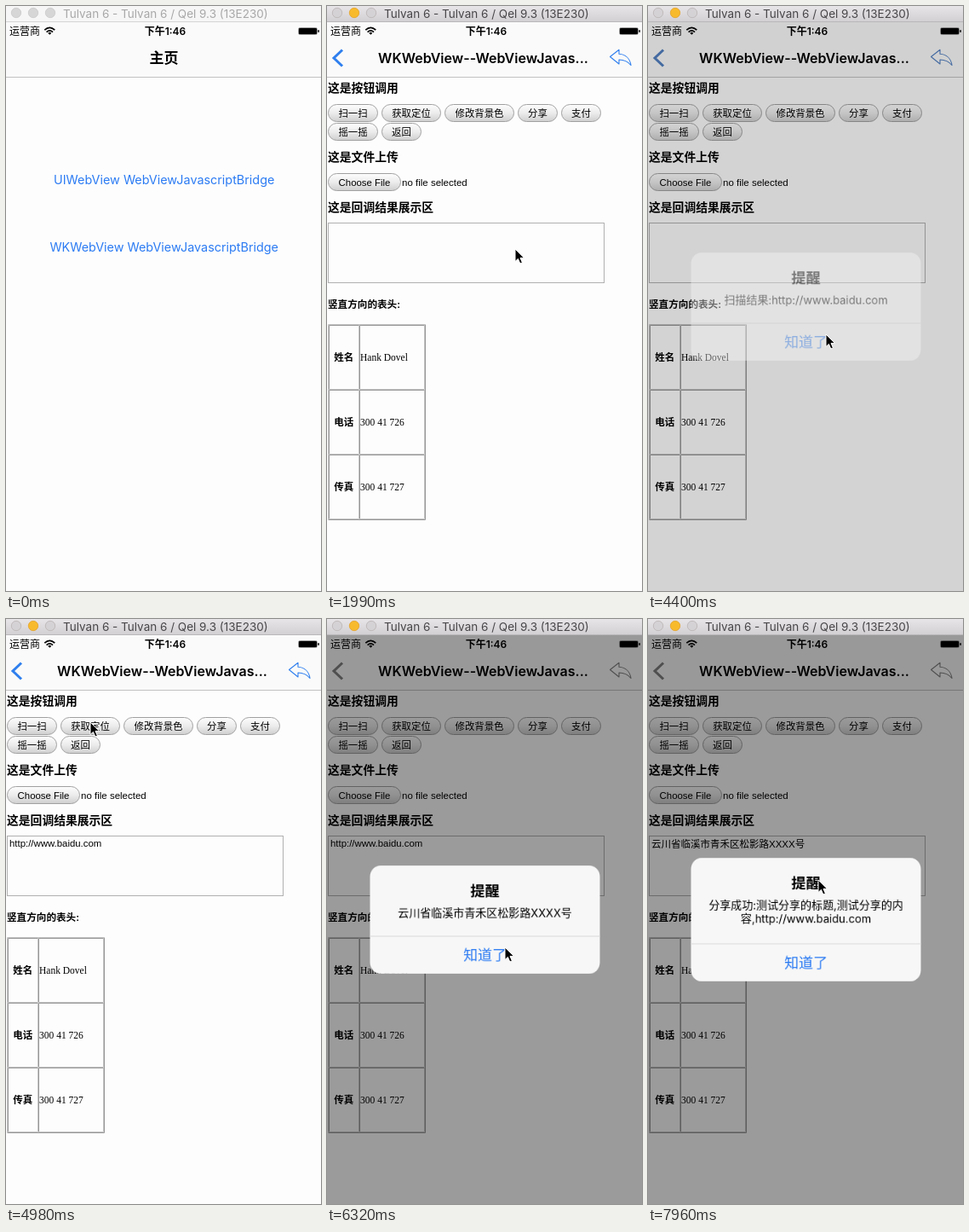
An HTML page that plays this animation: 370x686 px, repeating every 8 s.

```html
<!DOCTYPE html>
<html lang="zh-CN">
<head>
<meta charset="utf-8">
<title>WebViewJavascriptBridge</title>
<style>
  html, body { margin: 0; width: 100%; height: 100%; overflow: hidden; background: #fdfdfd; }
  svg { display: block; width: 370px; height: 686px; overflow: hidden; }
  text { font-family: Inter, "Noto Sans CJK SC", sans-serif; white-space: pre; }
  .web text { font-family: "Liberation Sans", "Noto Sans CJK SC", sans-serif; }
  .web .serif { font-family: "Liberation Serif", serif; }
  .mid { text-anchor: middle; }
  .bold { font-weight: 700; }
  .semi { font-weight: 600; }
  .medium { font-weight: 500; }
  .blue { fill: #2b7bf3; }
  .dull { fill: #a8a8a8; }
  .dark { fill: #484648; }
  .icon { fill: none; stroke: #2f7fee; }

  .anim { animation: 8s infinite both; }
  .step { animation-timing-function: step-end; }
  .push { animation-timing-function: cubic-bezier(.2, .7, .2, 1); }
  .spring { animation-timing-function: cubic-bezier(.22, .5, .2, 1); }

  .idle { animation-name: idle; }
  .active { animation-name: active; }
  .home { animation-name: home; }
  .page { animation-name: page; }
  .homeTitle { animation-name: homeTitle; }
  .pageTitle { animation-name: pageTitle; }
  .icons { animation-name: icons; }
  .icon { animation-name: tint; }
  .web { animation-name: web; }
  .band { animation-name: band; }
  .url { animation-name: url; }
  .place { animation-name: place; }
  .shade, .alert { animation-name: show; }
  .zoom { animation-name: zoom; transform-origin: 185.5px 352.5px; }
  .a1 { animation-name: a1; }
  .a2 { animation-name: a2; }
  .a3 { animation-name: a3; }
  .cursor { animation-name: cursor; animation-timing-function: ease-in-out; }

  @keyframes idle { 0% { opacity: 1 } 16%, to { opacity: 0 } }
  @keyframes active { 0% { opacity: 0 } 16%, to { opacity: 1 } }
  @keyframes home {
    0%, 17.5% { transform: none }
    23.2%, to { transform: translateX(-111px) }
  }
  @keyframes page {
    0%, 17.5% { transform: translateX(375px) }
    23.2%, to { transform: none }
  }
  @keyframes homeTitle {
    0%, 17.5% { transform: none; opacity: 1 }
    23.2%, to { transform: translateX(-150px); opacity: 0 }
  }
  @keyframes pageTitle {
    0%, 17.5% { transform: translateX(150px); opacity: 0 }
    23.2%, to { transform: none; opacity: 1 }
  }
  @keyframes icons { 0%, 17.5% { opacity: 0 } 23.2%, to { opacity: 1 } }
  @keyframes web { 0% { opacity: 0 } 24.8%, to { opacity: 1 } }
  @keyframes band { 0% { opacity: 0 } 87% { opacity: 1 } 95.3%, to { opacity: 0 } }
  @keyframes url { 0% { opacity: 0 } 59% { opacity: 1 } 85%, to { opacity: 0 } }
  @keyframes place { 0% { opacity: 0 } 85%, to { opacity: 1 } }
  @keyframes a1 { 0% { opacity: 1 } 62%, to { opacity: 0 } }
  @keyframes a2 { 0% { opacity: 0 } 62% { opacity: 1 } 88%, to { opacity: 0 } }
  @keyframes a3 { 0% { opacity: 0 } 88%, to { opacity: 1 } }
  @keyframes show {
    0%, 41.95% { opacity: 0 } 46.95%, 53.9% { opacity: 1 }
    58.9%, 69.05% { opacity: 0 } 74.05%, 80% { opacity: 1 }
    85%, 95.5% { opacity: 0 } 99.5%, to { opacity: 1 }
  }
  @keyframes tint {
    0%, 41.95% { stroke: #2f7fee } 46.95%, 53.9% { stroke: #808080 }
    58.9%, 69.05% { stroke: #2f7fee } 74.05%, 80% { stroke: #808080 }
    85%, 95.5% { stroke: #2f7fee } 99.5%, to { stroke: #808080 }
  }
  @keyframes zoom {
    0%, 41.95% { transform: scale(1.2) } 46.95%, 59% { transform: none }
    59.01%, 69.05% { transform: scale(1.2) } 74.05%, 85% { transform: none }
    85.01%, 95.5% { transform: scale(1.2) } 99.5%, to { transform: none }
  }
  @keyframes cursor {
    0%, 9.1% { transform: translate(374px, 470px) }
    15.6%, 31.4% { transform: translate(221px, 285px) }
    37.6%, 43.4% { transform: translate(34.5px, 120px) }
    50.6%, 55.3% { transform: translate(209px, 385px) }
    60.75% { transform: translate(102px, 129px) }
    62.25% { transform: translate(99px, 121px) }
    66.8% { transform: translate(99px, 121px); animation-timing-function: ease-in }
    69.6% { transform: translate(213px, 318px); animation-timing-function: ease-out }
    73%, 80.3% { transform: translate(209px, 385px) }
    87.25% { transform: translate(250px, 152px) }
    90.1%, 95% { transform: translate(237px, 120px) }
    99.4%, to { transform: translate(200px, 306px) }
  }
</style>
</head>
<body>
<svg id="stage" viewBox="0 0 370 686" xmlns="http://www.w3.org/2000/svg"></svg>
<script>
  const device = 'Tulvan 6 - Tulvan 6 / Qel 9.3 (13E230)';
  const link = 'http://www.baidu.com';
  const address = '云川省临溪市青禾区松影路XXXX号';

  // Text whose line is centred on y
  const text = (x, y, size, str, cls = '') =>
    `<text x="${x}" y="${(y + size * .37).toFixed(2)}" font-size="${size}" class="${cls}">${str}</text>`;

  const rect = (x, y, w, h, attrs) =>
    `<rect x="${x}" y="${y}" width="${w}" height="${h}" ${attrs}/>`;

  // Outline with one colour for the top left and one for the bottom right
  const bevel = (x, y, w, h, upper, lower) => `<g fill="none">
    <path stroke="${lower}" d="M${x} ${y + h}h${w}v${-h}"/>
    <path stroke="${upper}" d="M${x} ${y + h}v${-h}h${w}"/></g>`;

  const group = (cls, ...parts) => `<g class="anim ${cls}">${parts.join('')}</g>`;

  const light = (i, fill, stroke) =>
    `<circle cx="${12 + 20 * i}" cy="8" r="5.7" fill="${fill}" stroke="${stroke}" stroke-width=".8"/>`;

  const button = ([left, right, y, label]) =>
    rect(left + .5, y + .5, right - left - 1, 20, 'rx="10" fill="url(#pill)" stroke="#a0a0a0"') +
    text((left + right) / 2, y + 10.5, 11.4, label, 'mid');

  const buttons = [
    [1, 60, 115, '扫一扫'], [64, 134, 115, '获取定位'], [138, 220, 115, '修改背景色'],
    [224, 271, 115, '分享'], [275, 322, 115, '支付'],
    [1, 60, 137, '摇一摇'], [64, 111, 137, '返回'],
    [1, 87, 196, 'Choose File']
  ];

  const rows = [['姓名', 'Hank Dovel'], ['电话', '300 41 726'], ['传真', '300 41 727']];

  const table = bevel(1.5, 373.5, 114, 229, '#c4c4c4', '#979797') +
    rows.map(([head, value], i) => {
      const y = 374.5 + 76 * i;
      return bevel(2.5, y, 35, 75, '#979797', '#c4c4c4') +
        bevel(38.5, y, 76, 75, '#979797', '#c4c4c4') +
        text(19.7, y + 37.5, 11.5, head, 'mid bold') +
        text(39, y + 37.5, 11.5, value, 'serif');
    }).join('');

  const alertBox = (cls, top, bottom, lines) => group('step ' + cls,
    rect(50.5, top, 270, bottom - top, 'rx="13" fill="#f7f7f7"'),
    text(185.5, top + 30, 17, '提醒', 'mid semi'),
    ...lines.map((line, i) => text(185.5, top + 55.5 + 16 * i, 13, line, 'mid')),
    rect(50.5, bottom - 44.5, 270, 1, 'fill="#dcdcdc"'),
    text(185.5, bottom - 21.5, 17, '知道了', 'mid medium blue'));

  const titleBar =
    group('step idle', rect(0, 0, 370, 18, 'fill="#f6f6f6"'), rect(0, 18, 370, 1, 'fill="#d4d4d4"'),
      ...[0, 1, 2].map(i => light(i, '#d6d6d6', '#cacaca')),
      text(67, 8.5, 13.5, device, 'dull')) +
    group('step active', rect(0, 0, 370, 18, 'fill="url(#bar)"'), rect(0, 18, 370, 1, 'fill="#b9b7b9"'),
      light(0, '#d5d2d5', '#b9b4b4'), light(1, '#f8ba2d', '#e3a22a'), light(2, '#d5d2d5', '#b9b4b4'),
      text(67, 8.5, 13.5, device, 'dark'));

  const statusBar = text(4, 29.5, 12, '运营商') +
    `<path fill="none" stroke="#000" stroke-width="1.7"
      d="M45.3 28.2Q51.3 22.6 57.3 28.2M47.6 30.6Q51.3 27.2 55 30.6"/>
    <path d="M49.3 31.7Q51.3 30 53.3 31.7L51.3 33.8Z"/>` +
    text(187, 29.5, 12, '下午1:46', 'mid semi') +
    rect(343.5, 25.5, 22, 8, 'rx="1.8" fill="none" stroke="#777" stroke-width=".7"') +
    rect(344, 26, 21, 7, 'rx=".8"') + rect(366.3, 28, 1.5, 3, 'rx=".7"');

  const navBar = rect(0, 19, 370, 64, 'fill="#fafafa"') + rect(0, 83, 370, 1, 'fill="#c2c2c2"') +
    statusBar +
    group('push homeTitle', text(185.5, 61, 17, '主页', 'mid semi')) +
    group('push pageTitle', text(183.5, 61.3, 16, 'WKWebView--WebViewJavas...', 'mid semi')) +
    group('push icons',
      '<path class="anim spring icon" stroke-width="3" d="M18 51.5L8 61L18 70.5"/>',
      `<path class="anim spring icon" stroke-width="1.1" stroke-linejoin="round"
        d="M332.5 59.5L343 51.3V56.3C351 56.8 356 62 357 69.5C353 64.5 349 63 343 63V68Z"/>`);

  const home = group('push home', rect(0, 84, 370, 602, 'fill="#fdfdfd"'),
    text(185.7, 203.4, 14.4, 'UIWebView WebViewJavascriptBridge', 'mid blue'),
    text(185.7, 282.4, 14.4, 'WKWebView WebViewJavascriptBridge', 'mid blue'));

  const page = group('push page',
    rect(-4, 84, 4, 602, 'fill="#000" opacity=".06"'), rect(0, 84, 370, 602, 'fill="#fdfdfd"'),
    group('step band', rect(0, 603, 370, 83, 'fill="#f7f7f7"')),
    group('step web',
      text(1, 96, 13.8, '这是按钮调用', 'bold'),
      text(1, 177, 13.8, '这是文件上传', 'bold'),
      text(1, 236, 13.8, '这是回调结果展示区', 'bold'),
      text(1, 350, 11.6, '竖直方向的表头:', 'bold'),
      buttons.map(button).join(''),
      text(88, 206.5, 11.5, 'no file selected'),
      rect(1.5, 254.5, 324, 70, 'fill="#fdfdfd" stroke="#b0b0b0"'),
      group('step url', text(4, 263, 11.4, link)),
      group('step place', text(4, 263.5, 11.5, address)),
      table));

  const alerts = `<g class="anim spring alert"><g class="anim spring zoom">` +
    alertBox('a1', 289, 416, ['扫描结果:' + link]) +
    alertBox('a2', 289, 416, [address]) +
    alertBox('a3', 280, 425, ['分享成功:测试分享的标题,测试分享的内', '容,' + link]) +
    '</g></g>';

  const cursor = group('cursor',
    `<path d="M0 0V14.5L3.4 11.4L5.8 17L8.4 15.9L6 10.4H10.6Z" fill="#000" stroke="#fff" stroke-width="1"/>`);

  const defs = `<defs>
    <linearGradient id="bar" x2="0" y2="1"><stop stop-color="#e8e5e8"/><stop offset="1" stop-color="#d3d0d3"/></linearGradient>
    <linearGradient id="pill" x2="0" y2="1"><stop stop-color="#fdfdfd"/><stop offset=".5" stop-color="#ececec"/><stop offset="1" stop-color="#cfcfcf"/></linearGradient>
  </defs>`;

  document.getElementById('stage').innerHTML = defs + home + page + navBar +
    `<g class="anim spring shade">${rect(0, 19, 370, 667, 'fill-opacity=".39"')}</g>` +
    titleBar + alerts + cursor;
</script>
</body>
</html>
```
